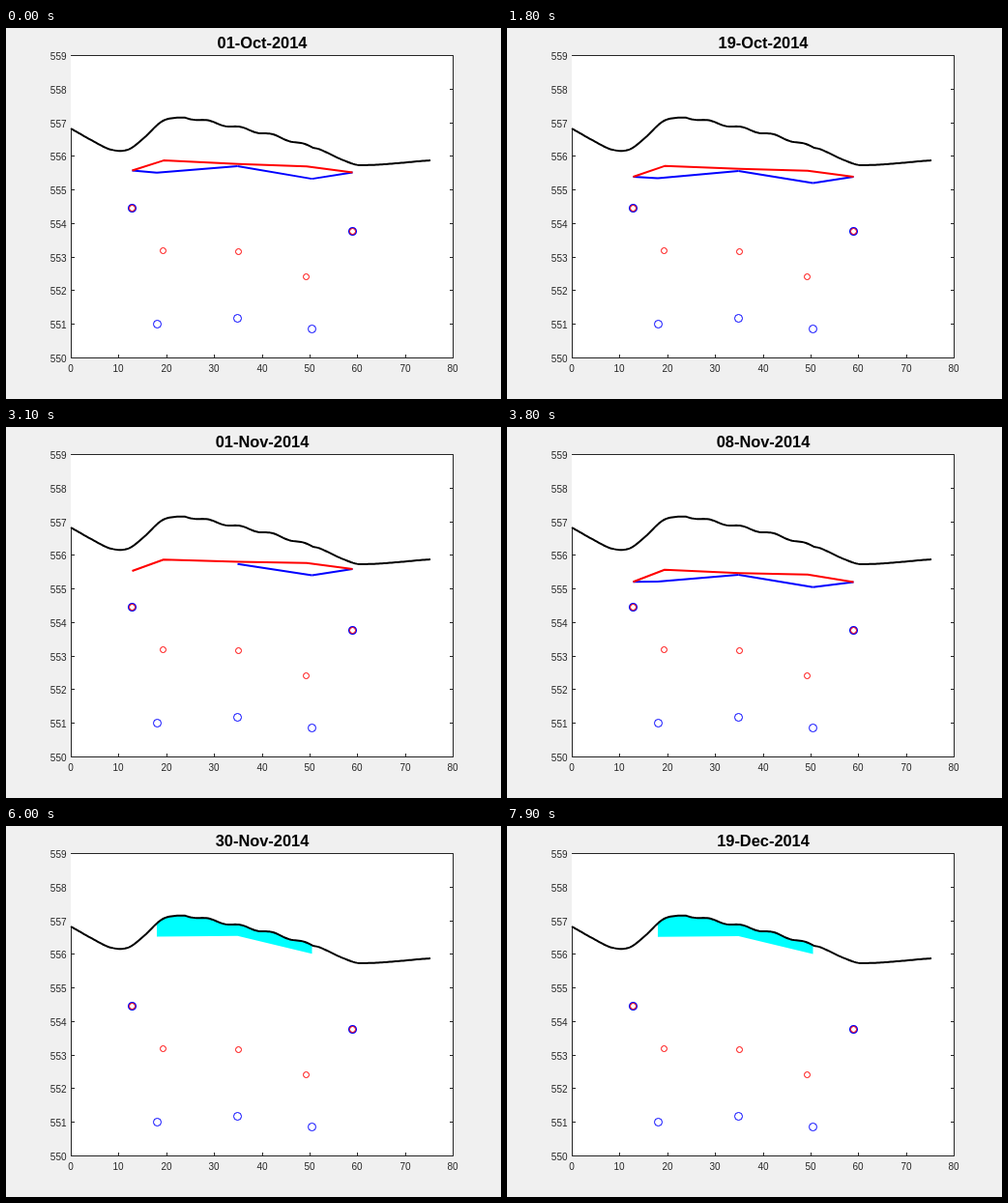
Write an HTML page with a canvas that moves like this. It is 512x384 px and loops after 8000 ms.

```html
<!DOCTYPE html>
<html lang="en">
<head>
<meta charset="utf-8">
<title>Daily cross-section</title>
<style>
html, body { margin: 0; width: 100%; height: 100%; overflow: hidden; background: #f0f0f0; }
canvas { display: block; }
</style>
</head>
<body>
<canvas id="plot" width="512" height="384"></canvas>
<script>
const ctx = document.getElementById('plot').getContext('2d');
const LOOP = 8000, DAY = 100;
const BOX = { l: 67.5, t: 28.5, r: 462.5, b: 341.5 };
const FONT = '"Liberation Sans", Arial, sans-serif';
const BLUE = '#00f', RED = '#f00', CYAN = '#0ff', INK = '#262626';
const MONTHS = ['Oct', 'Nov', 'Dec'];
const FREEZE = 43, DRY = 50;

const mix = (a, b, k) => a + (b - a) * k;
const clamp = k => Math.min(1, Math.max(0, k));

// Ground: a smooth curve through a few points, with steps on the long slope
const hill = [
  [67, 104], [90, 117], [108, 125.7], [126, 126], [143, 113.5], [160, 97.5],
  [172, 93.3], [190, 93.2], [218, 98.7], [251, 105.3], [284, 113.3],
  [317, 123.7], [325, 125.8], [350, 137.3], [367, 142], [439, 137]
];

function slope(i) {
  const a = hill[Math.max(0, i - 1)], b = hill[Math.min(hill.length - 1, i + 1)];
  return (b[1] - a[1]) / (b[0] - a[0]);
}

function groundY(x) {
  const i = Math.max(0, hill.findIndex(p => p[0] >= x) - 1);
  const [x0, y0] = hill[i], [x1, y1] = hill[i + 1];
  const w = x1 - x0, k = (x - x0) / w, q = 1 - k;
  const base = mix(y0, y1, k * k * (3 - 2 * k)) +
    w * k * q * (slope(i) * q - slope(i + 1) * k);
  const stepped = x > 185 && x < 317;
  return base + (stepped ? 1.2 * Math.sin((x - 218) / 33 * Math.PI * 2) : 0);
}

const ground = [];
for (let x = 67; x <= 439; x += 2) ground.push([x, groundY(x)]);

// Water level at the two banks: [day, left, right]
const LEFT = 130.5, RIGHT = 358.5;
const banks = [
  [0, 147.5, 149.5], [8, 156, 157], [18, 154, 154], [31, 149, 147],
  [36, 157, 156], [41, 165, 167], [46, 154.5, 157.5]
];

// Inner wells: x, bend below the bank line, lift while freezing
const blueWells = [[156, 2, 6], [239.5, -5.5, 4], [316.5, 7, 3.7]];
const redWells = [[163, -10.7, 4], [240.5, -7.7, 2.6], [311, -5.9, 3.8]];

function bankLevels(day) {
  const n = banks.findIndex(b => b[0] >= day);
  if (n < 0) return banks[banks.length - 1].slice(1);
  const a = banks[Math.max(0, n - 1)], b = banks[n];
  const k = n ? (day - a[0]) / (b[0] - a[0]) : 0;
  return [mix(a[1], b[1], k), mix(a[2], b[2], k)];
}

function profile(wells, day) {
  const [left, right] = bankLevels(day);
  const freezing = clamp((day - 36) / 10);
  const inner = wells.map(([x, bend, lift]) => [
    x,
    mix(left, right, (x - LEFT) / (RIGHT - LEFT)) + bend - 0.025 * day - lift * freezing
  ]);
  return [[LEFT, left], ...inner, [RIGHT, right]];
}

function line(points, color, width) {
  ctx.beginPath();
  points.forEach(p => ctx.lineTo(...p));
  ctx.strokeStyle = color;
  ctx.lineWidth = width;
  ctx.stroke();
}

function area(points, color) {
  ctx.beginPath();
  points.forEach(p => ctx.lineTo(...p));
  ctx.fillStyle = color;
  ctx.fill();
}

function ring(x, y, r, color, width = 1) {
  ctx.beginPath();
  ctx.arc(x, y, r, 0, Math.PI * 2);
  ctx.strokeStyle = color;
  ctx.lineWidth = width;
  ctx.stroke();
}

function label(text, x, y, align, font, color) {
  ctx.font = font + ' ' + FONT;
  ctx.textAlign = align;
  ctx.fillStyle = color;
  ctx.fillText(text, x, y);
}

function axes() {
  const { l, t, r, b } = BOX, tick = 3.5;
  ctx.fillStyle = '#fff';
  ctx.fillRect(l, t, r - l, b - t);
  ctx.strokeStyle = INK;
  ctx.lineWidth = 1;
  ctx.strokeRect(l, t, r - l, b - t);
  for (let i = 0; i <= 8; i++) {
    const x = Math.floor(mix(l, r, i / 8)) + 0.5;
    line([[x, b], [x, b - tick]], INK, 1);
    line([[x, t], [x, t + tick]], INK, 1);
    label(i * 10, x - 0.5, 356, 'center', '10px', INK);
  }
  for (let i = 0; i <= 9; i++) {
    const y = Math.floor(mix(b, t, i / 9)) + 0.5;
    line([[l, y], [l + tick, y]], INK, 1);
    line([[r, y], [r - tick, y]], INK, 1);
    label(550 + i, 62.5, y + 4.5, 'right', '10px', INK);
  }
}

function frozen(day) {
  if (day < FREEZE) return;
  const gap = Math.exp((FREEZE - day) / 4);
  area([
    [156, 60], [316.5, 60],
    [316.5, 132.4 - 5 * gap], [239.5, 114 - 9 * gap], [156, 114.8 - 12.5 * gap]
  ], CYAN);
}

// Open air hides everything above the ground, axis included
function sky() {
  area([[67, 29], ...ground, [439, 29]], '#fff');
}

function water(day) {
  if (day >= DRY) return;
  const missing = i => (i === 1 && day >= 29 && day < 36) || (i === 2 && day >= 44);
  const blue = profile(blueWells, day);
  for (let i = 0; i < 4; i++) {
    if (!missing(i) && !missing(i + 1)) line([blue[i], blue[i + 1]], BLUE, 2);
  }
  line(profile(redWells, day), RED, 2);
}

function sensors() {
  [[156.5, 306.5], [239.5, 300.5], [316.5, 311.5]].forEach(p => ring(...p, 4, BLUE));
  [[162.5, 230.5], [240.5, 231.5], [310.5, 257.5]].forEach(p => ring(...p, 3, RED));
  [[130.5, 186.5], [358.5, 210.5]].forEach(p => {
    ring(...p, 3.8, BLUE, 1.5);
    ring(...p, 3, RED);
  });
}

function draw() {
  const day = Math.floor(performance.now() % LOOP / DAY);
  const date = new Date(Date.UTC(2014, 9, 1 + day));
  const title = String(date.getUTCDate()).padStart(2, '0') + '-' +
    MONTHS[date.getUTCMonth() - 9] + '-2014';
  ctx.fillStyle = '#f0f0f0';
  ctx.fillRect(0, 0, 512, 384);
  ctx.lineJoin = 'round';
  axes();
  frozen(day);
  sky();
  line(ground, '#000', 2);
  water(day);
  sensors();
  label(title, 265, 21, 'center', 'bold 16.4px', '#000');
  requestAnimationFrame(draw);
}
draw();
</script>
</body>
</html>
```
